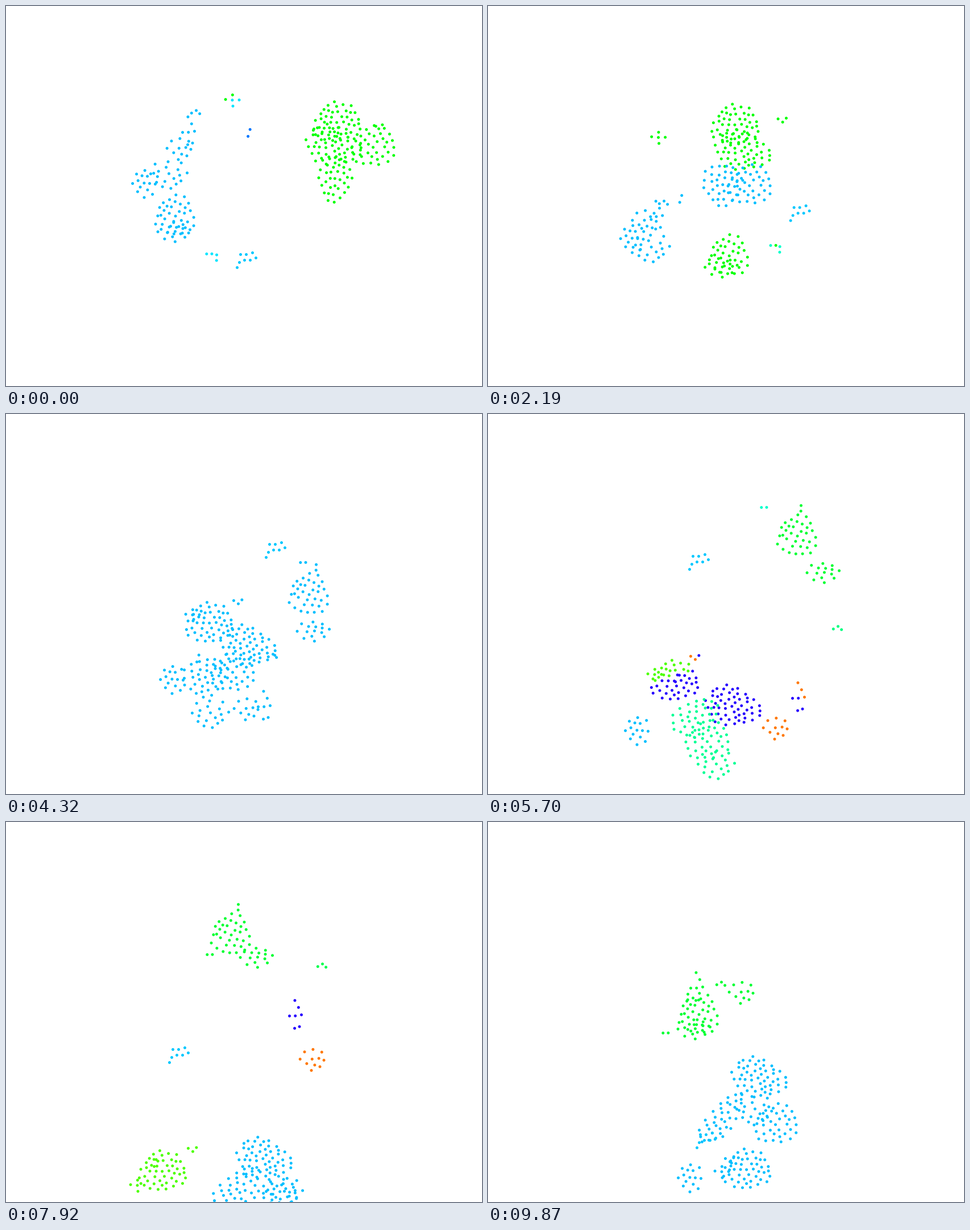
A matplotlib script for the animation above (9.9 s loop, 837 by 669 pixels).

```python
import colorsys

import matplotlib.pyplot as plt
import numpy as np
from matplotlib.animation import FuncAnimation

W, H, DPI = 837, 669, 64
FRAMES, STEP = 330, 30
DOT = 5  # diameter in pixels
TIMES = np.array([0, 1350, 3030, 4320, 5700, 7920, 9870], float)

ORANGE, LIME, GREEN, SPRING, AQUA = 28, 102, 120, 132, 155
TEAL, CYAN, SKY, BLUE, NAVY, INDIGO = 168, 186, 193, 195, 212, 249

rng = np.random.default_rng(11)


def spread(n):
    """n evenly spaced dots in a slightly wavy unit disc, sorted by height."""
    r, a = np.sqrt(rng.random(40 * n)), rng.uniform(0, 2 * np.pi, 40 * n)
    cloud = np.column_stack([r * np.cos(a), r * np.sin(a)])
    cloud[0] = -1, 0
    gap = np.full(len(cloud), np.inf)
    picks = [0]
    while len(picks) < n:
        gap = np.minimum(gap, np.hypot(*(cloud - cloud[picks[-1]]).T))
        picks.append(int(gap.argmax()))
    r, a = r[picks], a[picks]
    wave = 1 + 0.1 * np.sin(3 * a + rng.uniform(0, 6))
    dots = cloud[picks] * wave[:, None]
    return dots[dots[:, 1].argsort()]


def paint(hue, n):
    """One hue for all dots, or a pair: upper third, then the rest."""
    upper, lower = hue if isinstance(hue, tuple) else (hue, hue)
    hues = [upper if i < n / 3 else lower for i in range(n)]
    return np.array([colorsys.hsv_to_rgb(h / 360, 1, 1) for h in hues])


class Clump:
    """Dots in an ellipse (width, height, tilt) on a smooth path."""

    def __init__(self, dots, size, hues, path, end_size=None):
        self.dots = spread(dots) if isinstance(dots, int) else np.array(dots, float)
        self.size = np.array(size, float)
        self.grow = np.array(end_size or size) - self.size
        self.colors = [paint(hue, len(self.dots)) for hue in hues]
        self.path = np.array(path, float)
        h = np.diff(TIMES)[:, None]
        v = np.diff(self.path, axis=0) / h
        self.speed = np.empty_like(self.path)
        self.speed[1:-1] = (v[:-1] * h[1:] + v[1:] * h[:-1]) / (h[1:] + h[:-1])
        self.speed[0] = 2 * v[0] - self.speed[1]
        self.speed[-1] = 2 * v[-1] - self.speed[-2]

    def center(self, k, u):
        h = TIMES[k + 1] - TIMES[k]
        return ((1 + 2 * u) * (1 - u) ** 2 * self.path[k]
                + u * (1 - u) ** 2 * h * self.speed[k]
                + u * u * (3 - 2 * u) * self.path[k + 1]
                + u * u * (u - 1) * h * self.speed[k + 1])

    def state(self, t):
        k = min(np.searchsorted(TIMES, t, "right") - 1, len(TIMES) - 2)
        u = (t - TIMES[k]) / (TIMES[k + 1] - TIMES[k])
        rx, ry, tilt = self.size + self.grow * t / TIMES[-1]
        c, s = np.cos(np.radians(tilt)), np.sin(np.radians(tilt))
        dots = self.dots * (rx, ry) @ np.array([[c, s], [-s, c]])
        return dots + self.center(k, u), self.colors[k + (u >= 0.5)]


clumps = [
    # the large flock from the right
    Clump(46, (41, 35, -15),
          [GREEN] * 3 + [BLUE, (LIME, INDIGO), LIME, BLUE],
          [(582, 205), (488, 178), (391, 264), (358, 368), (328, 470), (275, 615), (455, 612)]),
    Clump(52, (47, 34, 12),
          [GREEN] * 3 + [BLUE, INDIGO, BLUE, BLUE],
          [(574, 245), (490, 224), (418, 307), (424, 408), (429, 514), (452, 592), (475, 450)]),
    Clump(35, (28, 40, 0),
          [GREEN] * 2 + [BLUE] * 2 + [AQUA, BLUE, BLUE],
          [(578, 302), (477, 287), (363, 360), (350, 462), (364, 534), (405, 645), (410, 522)],
          end_size=(52, 22, -50)),
    Clump(35, (40, 33, -20),
          [GREEN] * 2 + [BLUE] * 2 + [AQUA, BLUE, BLUE],
          [(645, 248), (535, 262), (402, 380), (398, 454), (385, 576), (474, 660), (505, 532)]),

    # the flock from the upper left, which breaks up
    Clump(15, (21, 25, 0), [BLUE] * 5 + [LIME, BLUE],
          [(243, 312), (217, 408), (294, 405), (292, 467), (262, 557), (310, 710), (355, 626)]),
    Clump(18, (33, 24, 0), [BLUE] * 4 + [AQUA, BLUE, BLUE],
          [(285, 295), (247, 390), (335, 455), (358, 526), (400, 616), (488, 650), (468, 505)]),
    Clump(11, (22, 19, 0), [BLUE] * 4 + [ORANGE, ORANGE, SPRING],
          [(304, 250), (228, 308), (348, 448), (422, 518), (505, 552), (538, 417), (445, 299)]),
    Clump(7, (11, 25, 0), [BLUE] * 4 + [(ORANGE, INDIGO), INDIGO, SPRING],
          [(320, 222), (258, 316), (360, 425), (453, 515), (545, 500), (508, 341), (366, 292)]),
    Clump(3, (8, 6, 0), [BLUE] * 4 + [150, 138, SPRING],
          [(333, 188), (272, 268), (372, 415), (468, 427), (614, 378), (555, 254), (409, 286)]),

    # the round flock circling the stage, with its tail
    Clump(34, (34, 36, 0), [BLUE, INDIGO, GREEN, BLUE] + [SPRING] * 3,
          [(297, 369), (363, 448), (481, 401), (532, 317), (543, 214), (395, 198), (370, 338)]),
    Clump(15, (26, 18, 0), [BLUE, INDIGO, GREEN, BLUE] + [SPRING] * 3,
          [(295, 397), (354, 470), (468, 428), (540, 382), (589, 279), (440, 238), (362, 364)]),

    # small groups
    Clump(5, (12, 11, 0), [(GREEN, CYAN), LIME, GREEN, BLUE, LIME, LIME, BLUE],
          [(398, 164), (305, 171), (313, 297), (328, 352), (293, 457), (231, 638), (411, 614)]),
    Clump(2, (7, 1, 105), [NAVY, 222, BLUE, BLUE, INDIGO, LIME, BLUE],
          [(427, 223), (359, 302), (331, 373), (337, 430), (331, 465), (262, 600), (426, 606)]),
    Clump(3, (7, 6, 0), [GREEN, LIME, GREEN, BLUE, (INDIGO, ORANGE), LIME, BLUE],
          [(654, 210), (572, 172), (465, 246), (407, 328), (363, 426), (327, 574), (424, 592)]),
    Clump(2, (5, 1, 0), [CYAN, TEAL, (GREEN, TEAL), BLUE, TEAL, SPRING, SPRING],
          [(357, 436), (456, 459), (528, 361), (522, 261), (485, 164), (358, 233), (312, 371)]),
    Clump(2, (5, 1, 90), [CYAN, TEAL, TEAL, BLUE] + [SPRING] * 3,
          [(370, 443), (468, 466), (541, 369), (545, 270), (550, 166), (408, 150), (351, 308)]),
    Clump([(-9, -7), (1, -7), (12, -10), (18, -1), (8, 3), (-2, 3), (-11, 7), (-15, 16)],
          (1, 1, 0), [SKY] * 7,
          [(421, 444), (517, 418), (546, 298), (472, 236), (369, 257), (302, 407), (382, 557)]),
]

fig = plt.figure(figsize=(W / DPI, H / DPI), dpi=DPI, facecolor="white")
ax = fig.add_axes([0, 0, 1, 1])
ax.set_xlim(0, W)
ax.set_ylim(H, 0)
ax.axis("off")
swarm = ax.scatter([], [], s=(DOT * 72 / DPI) ** 2, linewidths=0)


def draw(frame):
    places, colors = zip(*(clump.state(frame * STEP) for clump in clumps))
    swarm.set_offsets(np.concatenate(places) + 0.5)
    swarm.set_facecolors(np.concatenate(colors))
    return [swarm]


anim = FuncAnimation(fig, draw, frames=FRAMES, interval=STEP, repeat=True,
                     repeat_delay=0)
plt.show()
```
